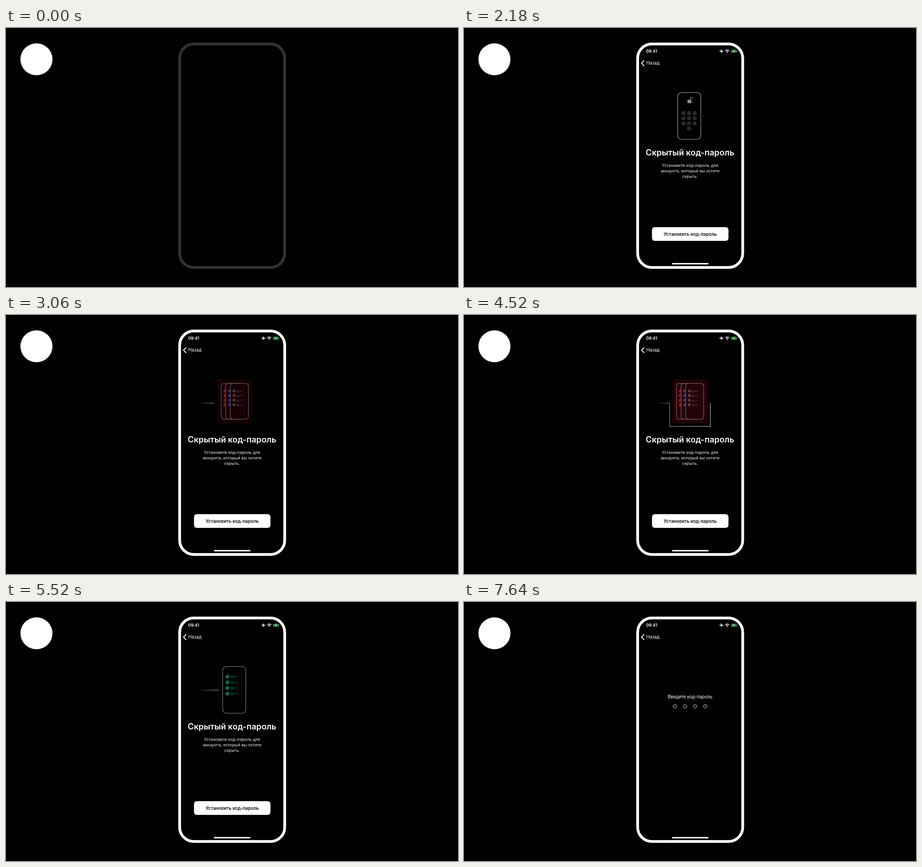
Recreate the animation shown at these times as an HTML page with a canvas. Size 987 px wide and 567 px high, loop 8000 ms.

```html
<!DOCTYPE html>
<html lang="ru">
<head>
<meta charset="utf-8">
<title>Код-пароль</title>
<style>
html, body { margin: 0; width: 100%; height: 100%; overflow: hidden; background: #000; }
canvas { display: block; }
</style>
</head>
<body>
<canvas id="stage" width="987" height="567"></canvas>
<script>
const LOOP = 8000, MID = 494, PAN = 150;
const ctx = document.getElementById('stage').getContext('2d');

const clamp = v => Math.max(0, Math.min(1, v));
const ramp = (t, a, b) => clamp((t - a) / (b - a));
const mix = (a, b, k) => a + (b - a) * k;
const inOut = u => u < .5 ? 2 * u * u : 1 - 2 * (1 - u) * (1 - u);
const outCubic = u => 1 - (1 - u) ** 3;
const gray = v => `rgb(${v},${v},${v})`;

function box(x, y, w, h, r) {
  ctx.beginPath();
  ctx.roundRect(x, y, w, h, r);
}
function fillBox(x, y, w, h, r, color) {
  box(x, y, w, h, r);
  ctx.fillStyle = color;
  ctx.fill();
}
function strokeBox(x, y, w, h, r, color, width) {
  box(x, y, w, h, r);
  ctx.strokeStyle = color;
  ctx.lineWidth = width;
  ctx.stroke();
}
function dot(x, y, r, color) {
  ctx.beginPath();
  ctx.arc(x, y, r, 0, Math.PI * 2);
  ctx.fillStyle = color;
  ctx.fill();
}
function poly(points) {
  ctx.beginPath();
  points.forEach(([x, y], i) => i ? ctx.lineTo(x, y) : ctx.moveTo(x, y));
}
function label(text, x, y, size, weight, color, align = 'center') {
  ctx.font = `${weight} ${size}px Inter, "Open Sans", sans-serif`;
  ctx.textAlign = align;
  ctx.fillStyle = color;
  ctx.fillText(text, x, y);
}
// Runs draw() with its own offset and opacity.
function layer(dx, alpha, draw) {
  ctx.save();
  ctx.translate(dx, 0);
  ctx.globalAlpha *= alpha;
  draw();
  ctx.restore();
}

function statusBar() {
  label('09:41', 409.7, 54.4, 9.1, 600, '#fff');

  // plane
  poly([[567, 50.7], [566, 50], [563.8, 49.9], [561.6, 46.7], [560.7, 46.7], [561.6, 49.9],
    [559.6, 50], [558.8, 48.9], [558.2, 48.9], [558.7, 50.7], [558.2, 52.5], [558.8, 52.5],
    [559.6, 51.4], [561.6, 51.5], [560.7, 54.7], [561.6, 54.7], [563.8, 51.5], [566, 51.4]]);
  ctx.fillStyle = '#fff';
  ctx.fill();

  // wifi
  ctx.strokeStyle = '#fff';
  ctx.lineWidth = 1.3;
  for (const r of [3.6, 6]) {
    ctx.beginPath();
    ctx.arc(574.8, 53.8, r, -Math.PI * .76, -Math.PI * .24);
    ctx.stroke();
  }
  dot(574.8, 53, 1.2, '#fff');

  // battery
  fillBox(583, 47.4, 12.8, 6.8, 2, '#1f8a3c');
  fillBox(596.2, 49.6, 1, 2.4, .5, '#5a7a62');
  poly([[589.9, 48.4], [587, 51.1], [588.8, 51.1], [588.4, 53.2], [591.3, 50.4], [589.5, 50.4]]);
  ctx.fillStyle = '#fff';
  ctx.fill();
}

function navBar(sliding, rest) {
  poly([[393.4, 71], [387.6, 77], [393.4, 83]]);
  ctx.strokeStyle = '#fff';
  ctx.lineWidth = 1.8;
  ctx.stroke();
  const back = () => label('Назад', 398, 80.4, 9.8, 400, '#fff', 'left');
  if (!sliding) return back();
  layer(-70 * (1 - rest), rest, back);
  layer(80 * rest, 1 - rest, back);
}

function outline() {
  strokeBox(468.5, 141.3, 50.6, 102.2, 8, '#9a989b', 1.2);
}

function keypad(t) {
  outline();
  const pulse = (a, b) => Math.sin(Math.PI * ramp(t, a, b));
  for (let i = 0; i < 10; i++) {
    const col = i < 9 ? i % 3 : 1, row = Math.floor(i / 3);
    const glow = i === 8 ? pulse(990, 1470) : i === 0 ? pulse(1590, 1930) : 0;
    dot(481.2 + col * 12.2, 186.2 + row * 11.3, 4.5, gray(mix(43, 160, glow)));
  }

  // lock, its shackle swings over to the right
  const open = inOut(ramp(t, 1680, 1920));
  fillBox(490, 157.2, 8.4, 7.4, 1.2, '#939194');
  const left = mix(491.4, 496.4, open), top = mix(153.2, 152, open), w = mix(5.6, 4.4, open);
  ctx.beginPath();
  ctx.moveTo(left, 158);
  ctx.lineTo(left, top + 2.2);
  ctx.arc(left + w / 2, top + 2.2, w / 2, Math.PI, 0);
  ctx.lineTo(left + w, mix(158, 156.4, open));
  ctx.strokeStyle = '#939194';
  ctx.lineWidth = 1.2;
  ctx.stroke();
}

function chatStack(t) {
  const tints = ['#b00a14', '#1f3f9a', '#4c4548'];
  tints.forEach((tint, i) => {
    const x = 464 + i * 10;
    fillBox(x, 149.7, 39.4, 78.6, 6, '#030103');
    strokeBox(x, 149.7, 39.4, 78.6, 6, '#858083', 1.1);
    for (let row = 0; row < 4; row++) {
      const y = 166.3 + row * 10.1;
      dot(x + 8, y, 3.3, tint);
      if (i < 2) continue;
      ctx.fillStyle = '#5f575a';
      ctx.fillRect(x + 13, y - .4, 14, .9);
      ctx.fillRect(x + 13, y + 2, 6, .9);
    }
  });

  ctx.save();
  ctx.beginPath();
  ctx.rect(456, 140.6, 76, 97);
  ctx.clip();
  ctx.globalAlpha *= mix(.42, .62, ramp(t, 2900, 4500));
  ctx.strokeStyle = '#a80a1c';
  ctx.lineWidth = 1.1;
  ctx.beginPath();
  for (let x = 361; x < 532; x += 5.1) {
    ctx.moveTo(x, 237.6);
    ctx.lineTo(x + 97, 140.6);
  }
  ctx.stroke();
  ctx.restore();
}

function greenChats() {
  outline();
  for (let row = 0; row < 4; row++) {
    const y = 163.4 + row * 12.5;
    dot(479, y, 4.2, '#008b64');
    ctx.fillStyle = '#0a4a37';
    ctx.fillRect(485.4, y - 3.2, 8.2, .9);
    ctx.fillRect(508, y - 3.6, 3.8, .9);
    ctx.fillStyle = '#007a57';
    ctx.fillRect(485.4, y - .6, 17.8, 1.1);
    ctx.fillRect(485.4, y + 2.1, 8.2, 1);
  }
}

// The wire that leads from phone to stack, around it and on.
function wire(t, cam, p1, p2) {
  const drawn = 75 * clamp(p1 / .92) + 191 * ramp(t, 3200, 4510) + 73 * clamp(p2 / .92);
  if (!drawn) return;
  const tone = ctx.createLinearGradient(428 + cam, 0, 540 + cam, 0);
  tone.addColorStop(0, '#77757a');
  tone.addColorStop(1, '#b4b2b6');
  poly([[524, 192.8], [599, 192.8], [599, 243.8], [688, 243.8], [688, 192.8], [761, 192.8]]);
  ctx.save();
  ctx.globalAlpha *= 1 - ramp(t, 5600, 5900);
  ctx.setLineDash([drawn, 999]);
  ctx.strokeStyle = tone;
  ctx.lineWidth = 1.3;
  ctx.stroke();
  ctx.restore();
}

function edgeFade(solid, clear) {
  const g = ctx.createLinearGradient(solid, 0, clear, 0);
  g.addColorStop(0, '#000');
  g.addColorStop(1, 'rgba(0,0,0,0)');
  ctx.fillStyle = g;
  if (solid < clear) ctx.fillRect(300, 136, clear - 300, 113);
  else ctx.fillRect(clear, 136, 700 - clear, 113);
}

function picture(t) {
  const p1 = inOut(ramp(t, 2090, 3220)), p2 = inOut(ramp(t, 4540, 5660));
  const cam = PAN * (p1 + p2);
  layer(-cam, 1, () => {
    if (p1 < 1) keypad(t);
    if (p1 > 0 && p2 < 1) layer(PAN, mix(.8, 1, ramp(t, 2900, 3700)), () => chatStack(t));
    if (p2 > 0) layer(PAN * 2, mix(.75, 1, ramp(t, 5360, 5900)), greenChats);
    wire(t, cam, p1, p2);
  });
  if (t > 2080 && t < 5920) {
    edgeFade(417, 450);
    edgeFade(574, 540);
  }
}

function introPage(t) {
  picture(t);
  label('Скрытый код-пароль', MID - .5, 278.8, 18.1, 600, '#fff');
  ['Установите код-пароль для', 'аккаунта, который вы хотите', 'скрыть.'].forEach(
    (line, i) => label(line, MID - .3, 304.3 + i * 12, 9.1, 400, '#eeecef'));

  const dim = ramp(t, 6600, 6780) - ramp(t, 7060, 7300);
  fillBox(410.5, 436, 167, 30, 6, gray(mix(255, 180, dim)));
  label('Установить код-пароль', MID, 454.7, 9.85, 600, gray(mix(14, 72, dim)));
}

function codePage() {
  ctx.fillStyle = '#000';
  ctx.fillRect(382, 92, 230, 432);
  label('Введите код-пароль', MID - .4, 210.5, 9.8, 400, '#fff');
  for (let i = 0; i < 4; i++) strokeBox(456.8 + i * 22.1, 224.9, 7.4, 7.4, 3.7, '#c4c4c4', 1.1);
}

function finger(t) {
  const alpha = ramp(t, 6020, 6120) - ramp(t, 7100, 7320);
  if (alpha <= 0) return;
  const go = outCubic(ramp(t, 6040, 6440)), press = inOut(ramp(t, 6600, 6780));
  const x = mix(494.5, 496.5, press), y = mix(384.5, mix(456.5, 454, press), go);
  dot(x, y, mix(18.4, 16.6, press), `rgba(80,76,80,${.75 * alpha})`);
}

function draw(t) {
  ctx.fillStyle = '#000';
  ctx.fillRect(0, 0, 987, 567);
  dot(66.5, 68.5, 35, '#fff');

  const shown = inOut(ramp(t, 30, 760));
  if (shown > 0) {
    ctx.save();
    box(381, 37, 226, 485, 29);
    ctx.clip();
    // critically damped spring for the page push
    const wt = Math.max(0, t - 7080) * .0156;
    const rest = t >= 7640 ? 0 : (1 + wt) * Math.exp(-wt);
    const sliding = t > 7080;
    if (rest > 0) layer(-70 * (1 - rest), 1, () => introPage(t));
    if (sliding) layer(224 * rest, 1, codePage);
    navBar(sliding, rest);
    statusBar();
    fillBox(454, 514.4, 80, 3, 1.5, '#fff');
    finger(t);
    if (shown < 1) {
      ctx.fillStyle = `rgba(0,0,0,${1 - shown})`;
      ctx.fillRect(376, 32, 236, 496);
    }
    ctx.restore();
  }
  strokeBox(379.2, 35, 229.4, 489.2, 31, gray(mix(51, 255, shown)), 6);
}

function tick(now) {
  draw(now % LOOP);
  requestAnimationFrame(tick);
}
draw(0);
requestAnimationFrame(tick);
</script>
</body>
</html>
```
